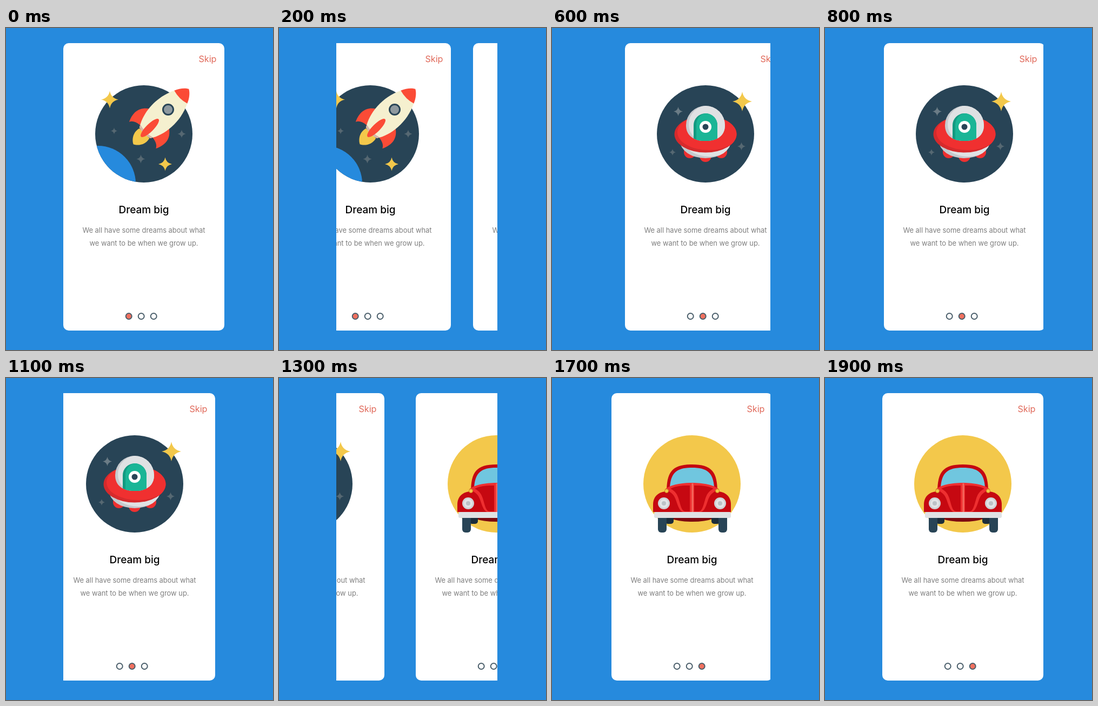
Write an HTML page that moves like this. It is 494 px wide and 596 px high and loops after 2000 ms.

```html
<!DOCTYPE html>
<html lang="en">
<head>
<meta charset="utf-8">
<title>Onboarding cards</title>
<style>
  html, body { margin: 0; width: 100%; height: 100%; overflow: hidden; background: #268add; }
  svg { display: block; width: 494px; height: 596px; }
  text { font-family: Inter, "Open Sans", sans-serif; }
  .title { font-size: 19px; font-weight: 500; fill: #000; text-anchor: middle; }
  .body { font-size: 12.9px; fill: #7e7e7e; text-anchor: middle; }
  .skip { font-size: 16.2px; fill: #e0695a; text-anchor: end; }
</style>
</head>
<body>
<svg viewBox="0 0 494 596">
  <defs>
    <path id="star" d="M0-1Q.16-.16 1 0Q.16.16 0 1Q-.16.16-1 0Q-.16-.16 0-1Z"/>
    <clipPath id="view"><rect x="106" y="28" width="298" height="532"/></clipPath>
    <clipPath id="disc"><circle cx="255" cy="196" r="90"/></clipPath>
    <clipPath id="rim"><ellipse cx="255" cy="196.500" rx="57.500" ry="34"/></clipPath>
    <path id="glass" d="M219 180a36 36 0 0 1 72 0C291 200 276 209 255 209S219 200 219 180Z"/>
    <clipPath id="dome"><use href="#glass"/></clipPath>
    <clipPath id="dish"><ellipse cx="255" cy="209" rx="47" ry="32"/></clipPath>

    <g id="rocket">
      <g clip-path="url(#disc)"><circle cx="170" cy="288" r="70" fill="#268add"/></g>
      <g transform="translate(300 151) rotate(45)">
        <path d="M-13 62C-17 76-8 87 0 91C8 87 17 76 13 62Z" fill="#f3c84b"/>
        <g id="fin">
          <path d="M-25 23C-42 34-43 50-35 67C-32 61-26 58-16 57Z" fill="#fb4b36"/>
        </g>
        <use href="#fin" transform="scale(-1 1)"/>
        <path d="M-17-33C-33 0-29 38-14 61Q0 65 14 61C29 38 33 0 17-33Z" fill="#f5f0cf"/>
        <path d="M-17 56L-14 61Q0 65 14 61L17 56Q0 61-17 56Z" fill="#d9b5a8"/>
        <path d="M-17-33C-13-43-6-51 0-54C6-51 13-43 17-33Q0-28-17-33Z" fill="#fb4b36"/>
        <circle r="9.500" fill="#8e999f" stroke="#284456" stroke-width="3"/>
        <ellipse cy="48" rx="7" ry="23" fill="#fb4b36"/>
      </g>
    </g>

    <g id="ufo">
      <g fill="#ee3030">
        <circle cx="226" cy="230" r="11"/>
        <circle cx="284" cy="230" r="11"/>
        <circle cx="255" cy="237" r="11"/>
      </g>
      <g clip-path="url(#dish)">
        <rect x="205" y="170" width="100" height="75" fill="#c5c9cd"/>
        <ellipse cx="262" cy="206" rx="47" ry="32" fill="#e0e2e4"/>
      </g>
      <g clip-path="url(#rim)">
        <rect x="195" y="160" width="120" height="75" fill="#d62a2c"/>
        <ellipse cx="261" cy="193" rx="58" ry="33" fill="#f03030"/>
      </g>
      <g clip-path="url(#dome)">
        <rect x="215" y="140" width="80" height="72" fill="#c6cace"/>
        <ellipse cx="260" cy="178" rx="36" ry="35" fill="#dfe1e3"/>
        <path d="M233 215V180a22 22 0 0 1 44 0V215Z" fill="#129a81"/>
        <path d="M238 215V180C238 168 246 158 257 158A22 22 0 0 1 277 180V215Z" fill="#1ab596"/>
      </g>
      <circle cx="255" cy="183" r="11" fill="#fff"/>
      <circle cx="255" cy="183" r="5.500" fill="#284456"/>
    </g>

    <g id="half">
      <rect x="205" y="252" width="16" height="18" rx="5" fill="#1c2e3b"/>
      <rect x="192" y="250" width="16" height="36" rx="6" fill="#284456"/>
    </g>
    <g id="lamp">
      <path d="M215 205C226 199 240 199 251 199V247H243C236 247 234 236 231 226C228 215 224 209 215 205Z" fill="#c60811"/>
      <circle cx="208" cy="209" r="3.500" fill="#f3c84b" stroke="#c98a1c"/>
      <circle cx="203" cy="232" r="11" fill="#cfd3d6"/>
      <circle cx="203" cy="232" r="8" fill="#e2e5e7"/>
      <circle cx="203" cy="232" r="4" fill="#bcc2c6"/>
    </g>
    <g id="car">
      <path d="M215 256H295V260Q280 266 255 266T215 260Z" fill="#7e0a10"/>
      <use href="#half"/>
      <use href="#half" transform="matrix(-1 0 0 1 512 0)"/>
      <path d="M208 212C208 174 218 160 255 160S302 174 302 212Z" fill="#c40811"/>
      <path d="M214 202C216 175 227 166 255 166S294 175 296 202Z" fill="#70c6df"/>
      <path d="M183 248V234C183 219 194 210 208 210H302C316 210 327 219 327 234V248Z" fill="#c60811"/>
      <path d="M205 206C222 190 288 190 305 206C292 212 288 216 284 228C280 240 277 248 270 248H240C233 248 230 240 226 228C222 216 218 212 205 206Z" fill="#ee2f30"/>
      <use href="#lamp"/>
      <use href="#lamp" transform="matrix(-1 0 0 1 510 0)"/>
      <rect x="254.500" y="195" width="3" height="53" fill="#f4685d"/>
      <rect x="185" y="248" width="142" height="11" rx="3" fill="#dfe2e4"/>
    </g>
  </defs>
  <g id="deck" clip-path="url(#view)"></g>
</svg>
<script>
const DARK = '#284456', GOLD = '#f3c84b', GREY = '#566872';

// stars: x, y, radius, colour
const pages = [
  { art: 'rocket', disc: DARK, stars: [[192, 132.5, 16, GOLD], [294.5, 252, 12.5, GOLD],
    [200, 190.5, 6, GREY], [325, 196, 7.5, GREY], [249.5, 242.5, 8, GREY]] },
  { art: 'ufo', disc: DARK, stars: [[323, 136, 18, GOLD], [204.5, 154.5, 8.5, '#6b7c86'],
    [194, 230, 6, GREY], [321.5, 219, 7.5, GREY]] },
  { art: 'car', disc: GOLD, stars: [] }
];
const slides = [{ start: 42, length: 864 }, { start: 1047, length: 763 }];
const LOOP = 2000, STEP = 100, EXIT = 378, ENTER = 328;

const star = ([x, y, r, fill]) =>
  `<use href="#star" transform="translate(${x} ${y}) scale(${r})" fill="${fill}"/>`;

const dot = (i, active) =>
  `<circle cx="${227.2 + 23 * i}" cy="533.5" r="5.5" stroke="#4a5e6a" stroke-width="2"
    fill="${i === active ? '#f0705f' : '#fff'}"/>`;

const card = (page, i) => `<g>
  <rect x="106" y="28" width="298" height="532" rx="10" fill="#fff"/>
  <text class="skip" x="389.5" y="63">Skip</text>
  <circle cx="255" cy="196" r="90" fill="${page.disc}"/>
  ${page.stars.map(star).join('')}
  <use href="#${page.art}"/>
  <text class="title" x="255" y="343">Dream big</text>
  <text class="body" x="255" y="379">We all have some dreams about what</text>
  <text class="body" x="255" y="403">we want to be when we grow up.</text>
  ${[0, 1, 2].map(n => dot(n, i)).join('')}
</g>`;

const deck = document.getElementById('deck');
deck.innerHTML = pages.map(card).join('');
const cards = [...deck.children];

const bezier = (a, b, s) => 3 * a * s * (1 - s) ** 2 + 3 * b * s * s * (1 - s) + s ** 3;

// cubic-bezier(.28, .1, .25, 1)
function ease(x) {
  if (x <= 0) return 0;
  if (x >= 1) return 1;
  let lo = 0, hi = 1;
  for (let i = 0; i < 24; i++) {
    const mid = (lo + hi) / 2;
    if (bezier(.28, .25, mid) < x) lo = mid; else hi = mid;
  }
  return bezier(.1, 1, lo);
}

function draw(t) {
  const done = slides.map(s => ease((t - s.start) / s.length));
  cards.forEach((el, i) => {
    const entered = i ? done[i - 1] : 1;
    const left = i < done.length ? done[i] : 0;
    const x = Math.round(ENTER * (1 - entered) - EXIT * left);
    el.setAttribute('transform', `translate(${x} 0)`);
    el.style.display = Math.abs(x) < 298 ? '' : 'none';
  });
}

let origin;
function tick(now) {
  origin ??= now;
  const t = (now - origin) % LOOP;
  draw(Math.floor((t + 4) / STEP) * STEP % LOOP);
  requestAnimationFrame(tick);
}
draw(0);
requestAnimationFrame(tick);
</script>
</body>
</html>
```
